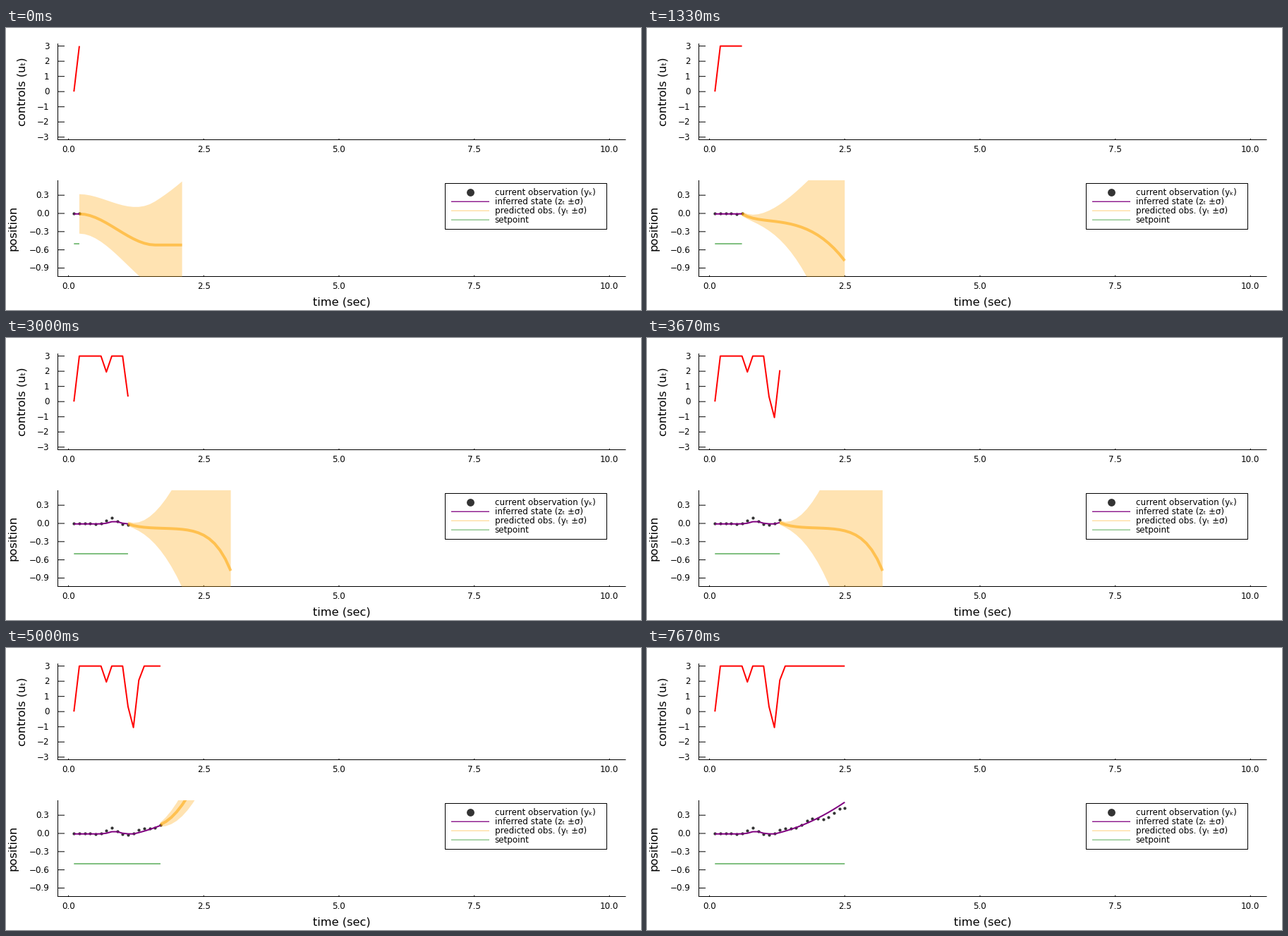
Recreate the animation shown at these times as a matplotlib script. Size 900 by 400 pixels, loop 8000 ms.

```python
import numpy as np
import matplotlib.pyplot as plt
from matplotlib.animation import FuncAnimation
from matplotlib.patches import Polygon, Rectangle

W, H, DPI = 900, 400, 100
PX = 72 / DPI  # points per pixel
LOOP_MS, TICK_MS, STEPS = 8000, 40, 24
HORIZON = np.arange(20) * 0.1
ESCAPE_STEP = 15  # from here on the forecast runs away upwards

plt.rcParams["font.family"] = "DejaVu Sans"
fig = plt.figure(figsize=(W / DPI, H / DPI), dpi=DPI, facecolor="white")
ax = fig.add_axes([0, 0, 1, 1])
ax.set(xlim=(0, W), ylim=(H, 0))
ax.axis("off")


def time_x(t):
    return 88.6 + 76.67 * np.asarray(t)


def control_y(u):
    return 90.2 - 21.53 * np.asarray(u)


def position_y(p):
    return 263.0 - 86.1 * np.asarray(p)


def line(xs, ys, color="black", width=1.0, **kw):
    return ax.plot(xs, ys, color=color, lw=width * PX, snap=False,
                   solid_capstyle="butt", **kw)[0]


def label(x, y, text, size=11.85, **kw):
    ax.text(x, y, text, fontsize=size * PX, va="baseline", **kw)


def panel(top, bottom, to_y, ticks, fmt, title, title_x):
    line([73.5, 73.5], [top, bottom + 0.5])
    line([73, 878.5], [bottom, bottom])
    for v in ticks:
        y = float(to_y(v))
        line([73.5, 83], [y, y])
        label(61.5, y + 4, format(v, fmt).replace("-", "−"), ha="right")
    for t in (0, 2.5, 5, 7.5, 10):
        x = float(time_x(t))
        line([x, x], [bottom - 1.7, bottom])
        label(x, bottom + 17.6, f"{t:.1f}", ha="center")
    label(title_x, (top + bottom) / 2, title, 16.3, ha="center",
          rotation=90, rotation_mode="anchor")


def legend():
    ax.add_patch(Rectangle((622.5, 220.5), 229, 65, fc="white", ec="black",
                           lw=PX, snap=False, zorder=8))
    rows = [("current observation (yₖ)", None, 1),
            ("inferred state (zₜ ±σ)", "purple", 1),
            ("predicted obs. (yₜ ±σ)", "orange", 0.4),
            ("setpoint", "green", 0.5)]
    for i, (text, color, alpha) in enumerate(rows):
        y = 233.3 + 12.95 * i
        if color:
            line([631, 685], [y, y], color, 1.3, alpha=alpha, zorder=9)
        else:
            ax.plot(657.5, y, "o", color="#333333", ms=10.8 * PX, mew=0, zorder=9)
        label(692.7, y + 3.9, text, zorder=9)


def smoothstep(x):
    x = np.clip(x, 0, 1)
    return x * x * (3 - 2 * x)


def bump(t, center, width):
    return np.exp(-((t - center) / width) ** 2)


def control(t):
    """Saturated at 3, with a shallow and a deep dip."""
    return np.interp(t, [.1, .2, .6, .7, .8, 1, 1.1, 1.2, 1.3, 1.4],
                     [0, 3, 3, 1.95, 3, 3, .33, -1.05, 2.07, 3])


def inferred(t):
    rise = np.maximum(t - 1.2, 0)
    return -0.008 + 0.042 * bump(t, .85, .13) + 0.2 * rise + 0.155 * rise ** 2


def observed(t):
    rise = np.maximum(t - 1.2, 0)
    sway = 0.02 * t * np.cos(2 * np.pi * (t - .77) / .55)
    return 0.075 * bump(t, .8, .12) + 0.3 * rise + sway


def forecast(step, now):
    """Mean and spread of the predicted position over the horizon."""
    start, s = inferred(now), HORIZON
    if step >= ESCAPE_STEP:
        k = step - ESCAPE_STEP
        speed = 0.37 + 1.35 * smoothstep(k / 4)
        mean = start + 0.04 * speed + speed * s + 1.1 * s ** 2
        return mean, np.exp(-k) * (0.035 + 0.38 * s)

    # An early swing to the setpoint gives way to a plateau with a late fall.
    k = max(step, 4)
    plateau = -0.05 - 0.3 / k
    fall = (-0.78 - plateau) * (s / s[-1]) ** min(6, 1 + 0.6 * k)
    late = plateau + (start - plateau) * np.exp(-s / 0.22) + fall
    swing = start - (0.52 + start) * smoothstep(s / 1.4)
    mix = min(step / 4, 1)
    spread = 0.035 + 0.29 * np.exp(-1.5 * step) + (0.2 + 0.08 * step) * s ** 2
    return (1 - mix) * swing + mix * late, spread


panel(22, 158.5, control_y, range(3, -4, -1), "d", "controls (uₜ)", 27.8)
panel(216, 352.5, position_y, (.3, 0.0, -.3, -.6, -.9), ".1f", "position", 14.8)
label(476, 393, "time (sec)", 16.3, ha="center")
legend()

control_line = line([], [], "red", 2, zorder=3)
dots = ax.plot([], [], "o", color="#333333", ms=4.2 * PX, mew=0, zorder=3)[0]
state_line = line([], [], "purple", 2, zorder=4)
band = ax.add_patch(Polygon(np.zeros((3, 2)), fc="orange", alpha=0.3, lw=0, zorder=5))
mean_line = line([], [], "orange", 4, alpha=0.55, zorder=6)
setpoint_line = line([], [], "green", 2, alpha=0.5, zorder=7)

window = Rectangle((73, 216), 805, 136.5, transform=ax.transData)
for artist in (dots, state_line, band, mean_line, setpoint_line):
    artist.set_clip_path(window)


def update(frame):
    # Each step begins in the tick that contains its start time.
    step = int((frame * TICK_MS + TICK_MS - 5) * STEPS / LOOP_MS)
    t = 0.1 * np.arange(1, step + 3)
    xs = time_x(t)
    control_line.set_data(xs, control_y(control(t)))
    dots.set_data(xs, position_y(observed(t)))
    state_line.set_data(xs, position_y(inferred(t)))
    setpoint_line.set_data(xs, position_y(np.full_like(t, -0.5)))

    mean, spread = forecast(step, t[-1])
    fx = time_x(t[-1] + HORIZON)
    mean_line.set_data(fx, position_y(mean))
    upper = np.column_stack([fx, position_y(mean + spread)])
    lower = np.column_stack([fx, position_y(mean - spread)])
    band.set_xy(np.vstack([upper, lower[::-1]]))
    return control_line, dots, state_line, band, mean_line, setpoint_line


anim = FuncAnimation(fig, update, frames=LOOP_MS // TICK_MS, interval=TICK_MS,
                     repeat=True, repeat_delay=0)
plt.show()
```
